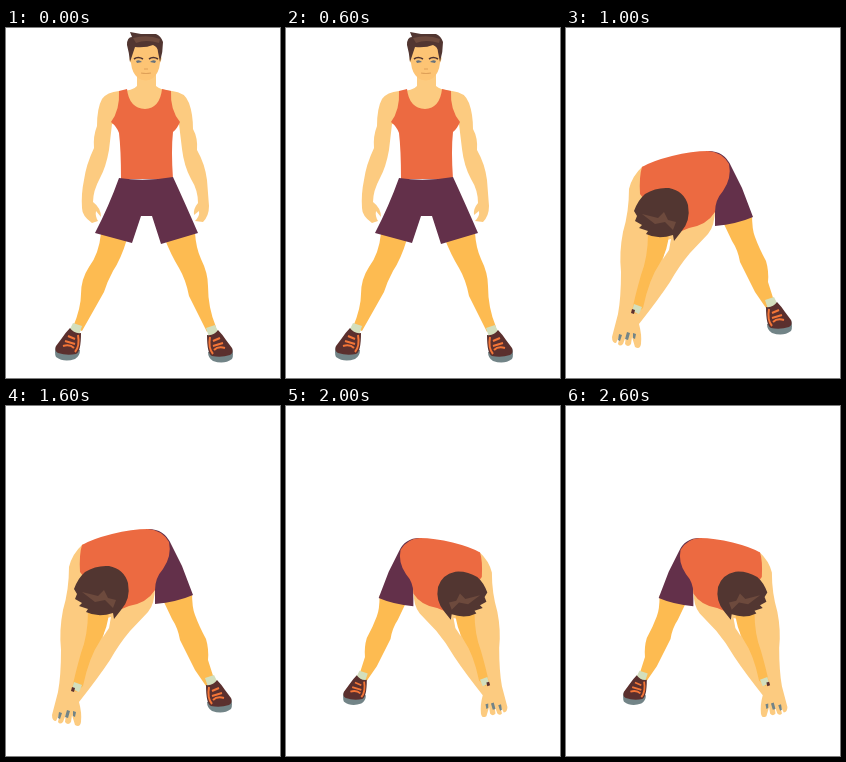
An HTML page that plays this animation: 274 px wide and 350 px high, repeating every 3 s.

```html
<!DOCTYPE html>
<html lang="en">
<head>
<meta charset="utf-8">
<title>Toe touch exercise</title>
<style>
html, body { margin: 0; width: 100%; height: 100%; overflow: hidden; background: #fff }
svg { display: block; width: 100%; height: 100% }
.pose { visibility: hidden }
.gap { fill: #fff }
.arm { fill: #fccb80 }
.face { fill: #fdc474 }
.leg { fill: #fdbb51 }
.shirt { fill: #ec6a41 }
.shorts { fill: #63304a }
.hair { fill: #523631 }
.streak { fill: #6d4a3d }
.sock { fill: #d3dfbd }
.shoe { fill: #5b302e }
.sole { fill: #728487 }
.lace { fill: none; stroke: #f47638; stroke-width: 2 }
.brow { fill: none; stroke: #523631; stroke-width: 1.6 }
.eye { fill: #66717c }
.line { fill: none; stroke: #dfa058; stroke-width: 1.2 }
</style>
</head>
<body>
<svg viewBox="0 0 274 350">
<defs>
  <g id="shoe">
    <path class="sock" d="M200 300L209 297L213 305L203 309Z"/>
    <path class="sole" d="M202 324L226 320Q228 327 226 331Q218 337 207 333Q202 330 202 324Z"/>
    <path class="shoe" d="M201 307Q208 308 212 302Q216 306 220 312L226 320Q228 325 224 327Q215 330 206 328Q201 326 201 307Z"/>
    <path class="lace" d="M204 309Q202 320 207 326M207 313L214 310M207 318L217 315M208 322Q212 318 219 320"/>
  </g>
  <g id="bend">
    <path class="leg" d="M157 194L186 186Q186 202 189 209Q193 220 200 233Q203 243 202 254L209 276L200 280L189 264L174 234Q172 222 166 213Z"/>
    <use href="#shoe" x="-1" y="-28"/>
    <path class="shorts" d="M140 123Q158 122 165 138L176 160L187 189Q171 196 149 198V176Z"/>
    <path class="arm" d="M77 138Q66 148 63 161Q63 184 57 204Q53 224 55 244Q55 270 52 286L46 309Q46 315 50 315L54 307L52 316Q54 319 57 316L60 308L59 316Q62 320 65 316L66 309L69 319Q74 322 75 316Q76 307 73 296Q92 272 104 254Q113 238 124 225L142 206Q149 198 149 180L120 160Z"/>
    <path class="gap" d="M101 212L105 211L103 222L97 231Z"/>
    <path class="leg" d="M82 205H103Q102 222 94 235Q83 251 77 280L70 286L66 283Q69 268 75 247Q82 229 82 205Z"/>
    <path class="sock" d="M68 276L76 279L73 286L66 283Z"/>
    <path class="shoe" d="M66 281L69 282L68 286L65 285Z"/>
    <path class="sole" d="M53 306l3 1-2 6-2-1zM61 304l3 1-2 7-3-1zM67 305l3 1-1 5-2-1z"/>
    <path class="shirt" d="M74 166Q73 148 76 139Q86 133 106 128Q126 123 142 123Q156 124 163 136Q166 150 157 163Q149 172 149 184Q141 197 123 200L106 207Z"/>
    <path class="hair" d="M79 166Q90 159 103 160Q118 163 122 177Q125 193 115 204L108 213L107 207Q92 212 80 206L82 203L73 200L76 197L69 193L71 188L68 183Q72 172 79 166Z"/>
    <path class="streak" d="M76 186L92 190L98 184L102 192L110 194L107 202L99 194L89 196Z"/>
  </g>
</defs>

<g class="pose">
  <path class="leg" d="M95 205L121 211Q115 231 107 243Q101 254 98 264L76 303L67 299Q75 280 75 266Q75 251 83 239Q93 226 95 205Z"/>
  <path class="leg" d="M158 209L189 205Q190 220 195 231Q202 245 202 258Q202 280 210 299L201 304L183 268Q180 252 173 240Q165 227 158 209Z"/>
  <use href="#shoe"/>
  <use href="#shoe" transform="matrix(-1 0 0 1 276 -2)"/>
  <path class="arm" d="M131 42H150V58Q154 62 166 63Q179 64 183 75Q187 86 187 101Q192 110 191 122Q199 136 201 152L203 178Q203 188 197 194L189 193Q194 188 193 183L188 187Q187 181 192 175Q192 162 185 151Q178 138 176 121L173 96H106L103 122Q100 139 94 150Q87 163 87 174Q95 180 95 189L90 183Q89 188 92 193L86 195Q76 188 76 180Q75 166 78 152Q80 137 88 120Q87 108 91 98Q91 80 96 71Q101 64 113 63Q127 63 131 58Z"/>
  <path class="shirt" d="M113 63L121 61Q123 80 139 81Q154 80 156 61L165 63Q164 82 174 94Q171 101 167 104Q165 122 167 151H115Q115 122 113 105Q111 99 105 94Q114 82 113 63Z"/>
  <path class="shorts" d="M113 150Q139 154 167 149Q179 175 192 205L155 216L146 188H135L126 215L89 205Q103 178 113 150Z"/>
  <path class="face" d="M125 12H154V28Q157 29 154 35Q153 45 147 50Q140 55 132 50Q126 45 125 35Q122 31 125 28Z"/>
  <path class="hair" d="M124 34Q123 24 121 17Q121 9 126 9L124 4L135 6L150 6Q155 8 157 14Q157 24 154 34L152 24Q152 19 147 17Q140 20 129 19L127 25Z"/>
  <path class="streak" d="M127 10Q142 6 154 11L153 15Q140 11 130 15Z"/>
  <path class="brow" d="M128 31Q132 28 137 31M143 31Q147 28 152 31"/>
  <path class="eye" d="M130 33Q133 31 136 34L131 35ZM144 34Q147 31 150 33L149 35Z"/>
  <path class="line" d="M138 41H142M135 45Q140 46 145 45"/>
</g>

<g class="pose"><use href="#bend"/></g>

<g class="pose"><use href="#bend" transform="matrix(-.913 0 0 .909 263.4 20.2)"/></g>
</svg>
<script>
const poses = document.querySelectorAll('.pose');
const HOLD = 1000;

function draw(now) {
  const current = Math.floor(now / HOLD) % poses.length;
  poses.forEach((pose, i) => pose.style.visibility = i === current ? 'visible' : 'hidden');
  requestAnimationFrame(() => draw(performance.now()));
}
draw(performance.now());
</script>
</body>
</html>
```
